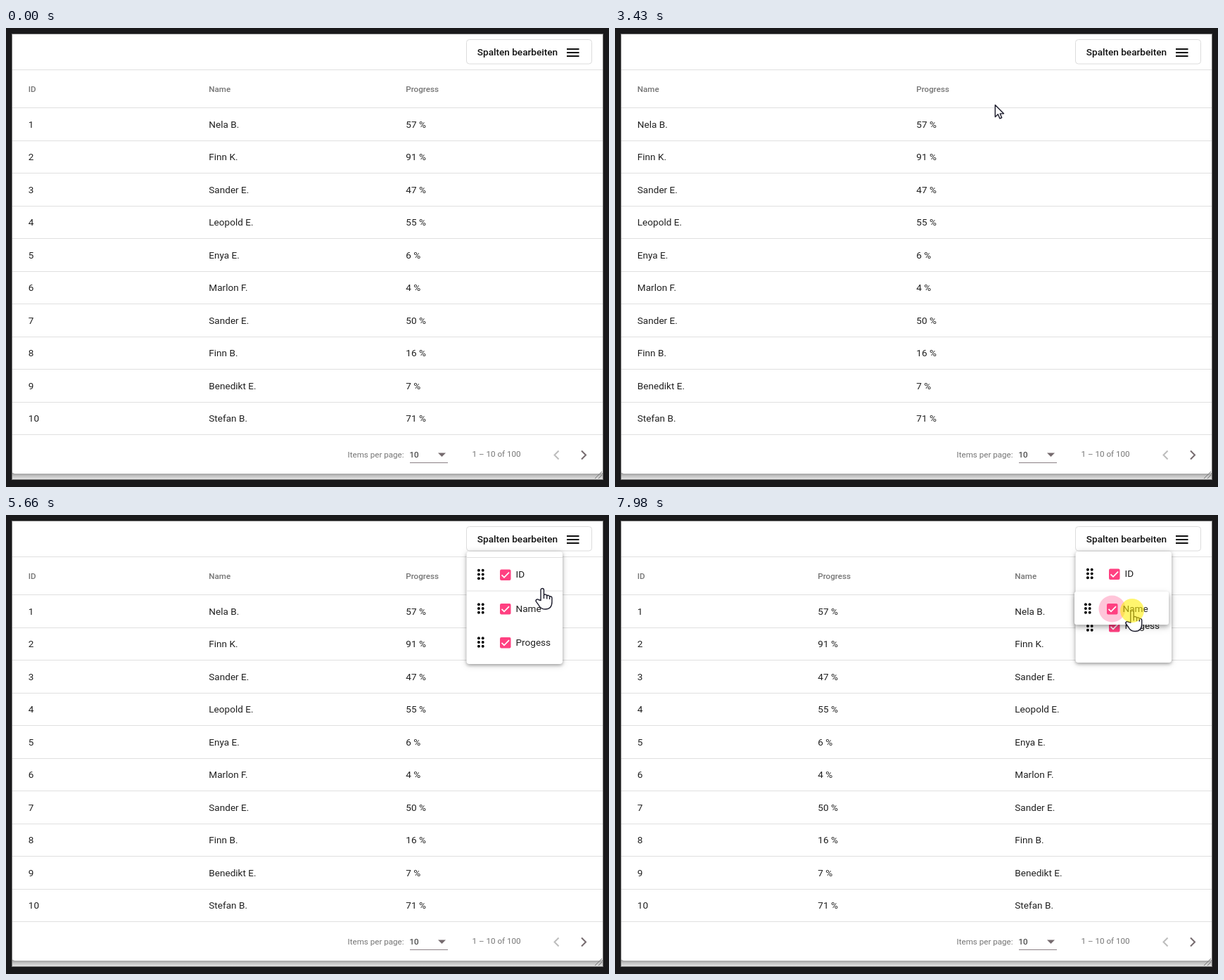
Animation, 857 px wide and 653 px high, one loop 8000 ms. Source, as an HTML page:

```html
<!DOCTYPE html>
<html lang="de">
<head>
<meta charset="utf-8">
<title>Spalten bearbeiten</title>
<style>
html, body { margin: 0; width: 100%; height: 100%; overflow: hidden; background: #19191b; }
svg { display: block; }
text { font: 13.58px Roboto, sans-serif; fill: #212121; white-space: pre; }
.small { font-size: 11.64px; fill: #757575; }
.medium { font-weight: 500; }
.line { fill: #e0e0e0; }
.icon { fill: none; stroke: #756a6e; stroke-width: 2; }
.panel { fill: #fff; filter: drop-shadow(0 2px 2px rgba(0,0,0,.26)) drop-shadow(0 1px 4px rgba(0,0,0,.2)); }
.preview { fill: #fff; filter: drop-shadow(0 3px 3px rgba(0,0,0,.24)) drop-shadow(0 3px 5px rgba(0,0,0,.16)); }
.ripple { fill: #ff4081; }
.cursor { fill: #fff; stroke: #1b1b2b; stroke-width: 1.4; stroke-linejoin: round; }
#menu { transform-origin: 654px 52px; }
</style>
</head>
<body>
<svg width="857" height="653" viewBox="0 0 857 653">
  <defs>
    <linearGradient id="shade" x2="0" y2="1">
      <stop stop-color="#999"/><stop offset=".5" stop-color="#c4c4c4"/><stop offset="1" stop-color="#e2e2e2"/>
    </linearGradient>
  </defs>
  <rect x="8.5" y="8.5" width="840" height="634" fill="#e6e6e6" stroke="#707070"/>
  <rect x="9" y="633" width="839" height="9" fill="url(#shade)"/>
  <path d="M9 9H848V630Q848 634 844 634H13Q9 634 9 630Z" fill="#fff"/>
  <path d="M837 641L847 631M842 641L847 636" stroke="#777" fill="none"/>

  <g id="rules"></g>
  <g id="tables"></g>

  <rect id="button" x="654.5" y="16.5" width="178" height="34.5" rx="4" stroke="#dcdcdc"/>
  <text class="medium" x="669.8" y="39" style="fill:#111">Spalten bearbeiten</text>
  <path d="M797 30H814.5M797 35H814.5M797 40H814.5" stroke="#111" stroke-width="2"/>

  <text class="small" x="485.5" y="611">Items per page:</text>
  <text class="small" x="573.5" y="611" style="fill:#212121">10</text>
  <path d="M614 604.5H625L619.5 610Z" fill="#756a6e"/>
  <rect x="574" y="618" width="54" height="1" fill="#8a8085"/>
  <text class="small" x="662.5" y="610">1 – 10 of 100</text>
  <path class="icon" d="M785.5 601.5L779.5 607.5L785.5 613.5" style="stroke:#bdbdbd"/>
  <path class="icon" d="M818 601.5L824 607.5L818 613.5"/>

  <g id="menu">
    <rect id="panel" class="panel" x="654.5" y="52" width="136.5" height="160" rx="4"/>
    <path id="focus" d="M655 60.5H791M655 108H791" stroke="#e0e0e0"/>
    <g id="items"></g>
  </g>

  <g id="pointer">
    <path id="arrow" class="cursor" d="M0 0V17L4 13.3L6.6 19.2L9.4 18L6.9 12.3H12.2Z"/>
    <g id="hand" class="cursor">
      <path d="M-2.2 17V2.2C-2.2 -.6 2.2 -.6 2.2 2.2V9.5C3 8 6.3 8.3 6.5 10.5C7.5 9.3 10.2 9.8 10.3 11.8C11.5 10.8 13.7 11.5 13.7 13.5V19C13.7 25 11 29.5 4 29.5C-1 29.5 -3.5 27 -5 24L-9 18.5C-10 16 -6.5 14.5 -5 16.3Z"/>
      <path d="M2.2 9.5V14.5M6.5 10.5V15M10.3 12V15.5" fill="none"/>
    </g>
    <circle id="press" r="17" fill="rgb(255,238,0)" fill-opacity=".57"/>
  </g>
</svg>
<script>
const $ = id => document.getElementById(id);
const show = (el, on) => el.style.display = on ? '' : 'none';
const clamp = v => Math.max(0, Math.min(1, v));
const ramp = (t, from, to) => clamp((t - from) / (to - from));
const smooth = p => p * p * (3 - 2 * p);
const easeOut = p => 1 - (1 - p) ** 3;

// Table
const people = 'Nela B.,Finn K.,Sander E.,Leopold E.,Enya E.,Marlon F.,Sander E.,Finn B.,Benedikt E.,Stefan B.'.split(',');
const percent = [57, 91, 47, 55, 6, 4, 50, 16, 7, 71];
const columns = {
  ID: people.map((_, i) => i + 1),
  Name: people,
  Progress: percent.map(v => v + ' %')
};
const wide = [31.8, 288.3, 568.3];
const layouts = {
  full: [['ID', 'Name', 'Progress'], wide],
  noId: [['Name', 'Progress'], [31.8, 428.3]],
  swapped: [['ID', 'Progress', 'Name'], wide]
};
const rule = y => `<rect class="line" x="9" y="${y}" width="839" height="1"/>`;
const rowY = (base, i) => Math.round(base + 46.5 * i);

$('rules').innerHTML = rule(59) + [...Array(11).keys()].map(i => rule(rowY(113, i))).join('');
$('tables').innerHTML = Object.entries(layouts).map(([id, [cols, xs]]) =>
  `<g id="${id}">` + cols.map((col, c) =>
    `<text class="small medium" x="${xs[c]}" y="91">${col}</text>` +
    columns[col].map((v, i) => `<text x="${xs[c]}" y="${rowY(141.5, i)}">${v}</text>`).join('')
  ).join('') + '</g>').join('');

// Menu items, drawn around y = 0
const dots = [-5.8, 0, 5.8].map(y => [671.9, 677.7].map(x =>
  `<circle cx="${x}" cy="${y}" r="1.95"/>`).join('')).join('');
$('items').innerHTML = ['ID', 'Progess', 'Name'].map(label => `<g>
  <rect class="preview" x="656" y="-24" width="134" height="47" rx="3"/>
  <circle class="ripple" cx="709.5" cy=".5" r="19"/>${dots}
  <g class="on"><rect x="702" y="-7" width="15.5" height="15.5" rx="2" fill="#ff4081"/>
    <path d="M704.5 .8L708 4.3L715 -2.9" fill="none" stroke="#fff" stroke-width="1.7"/></g>
  <rect class="off" x="703" y="-6" width="13.5" height="13.5" rx="1" fill="none" stroke="#756a6e" stroke-width="2"/>
  <text x="724.5" y="4.5">${label}</text></g>`).join('');
const [idItem, progressItem, nameItem] = $('items').children;

function place(item, x, y, { checked = true, dragged = false, ripple = 0, radius = 19 } = {}) {
  item.setAttribute('transform', `translate(${x} ${y})`);
  show(item.querySelector('.on'), checked);
  show(item.querySelector('.off'), !checked);
  show(item.querySelector('.preview'), dragged);
  const circle = item.querySelector('.ripple');
  circle.setAttribute('fill-opacity', ripple);
  circle.setAttribute('r', radius);
}

// Pointer actions: move from, move until, x, y, press, release
const home = [720, 645];
const acts = {
  open: [90, 940, 806, 40, 1260, 1490],
  hideId: [1560, 2190, 708, 87, 2340, 2490],
  close: [2970, 3200, 499, 120, 3200, 3290],
  reopen: [3350, 3700, 803, 43, 3730, 3850],
  showId: [3850, 4260, 712, 88, 4280, 4430],
  closeAgain: [4600, 4730, 639, 110, 4730, 4800],
  openAgain: [4800, 4960, 803, 43, 4960, 5300],
  grab: [5430, 5820, 739, 139.5, 5900, 6580],
  dragDown: [5900, 6270, 739, 183.5],
  dragUp: [7680, 7980, 735, 136, 7680, 8000]
};
const release = name => acts[name][5];
const between = (t, a, b) => t >= release(a) && t < release(b);

const pointerAt = t => Object.values(acts).reduce(([x, y], [from, to, tx, ty]) => {
  const p = smooth(ramp(t, from, to));
  return [x + (tx - x) * p, y + (ty - y) * p];
}, home);

function draw(t) {
  const [x, y] = pointerAt(t);
  const inBox = (left, top, right, bottom) => x > left && x < right && y > top && y < bottom;

  // Menu opens and closes on release
  const opened = between(t, 'open', 'close') ? 'open' : between(t, 'reopen', 'closeAgain') ? 'reopen'
    : t >= release('openAgain') ? 'openAgain' : '';
  const closed = t < release('reopen') ? 'close' : 'closeAgain';
  const fade = opened ? ramp(t, release(opened), release(opened) + 120)
    : t < release(closed) ? 0 : 1 - ramp(t, release(closed), release(closed) + 100);
  show($('menu'), fade > 0);
  $('menu').style.opacity = fade;
  $('menu').style.transform = `scale(${opened ? .8 + .2 * fade : 1})`;

  const overButton = !opened && inBox(654, 16, 833, 51);
  const overMenu = opened && inBox(654, 52, 791, 212);
  $('button').setAttribute('fill', overButton ? '#f6f6f6' : '#fff');

  const noId = between(t, 'hideId', 'showId');
  const layout = noId ? 'noId' : t < 6900 ? 'full' : 'swapped';
  for (const id in layouts) show($(id), id === layout);

  // Menu rows; the dragged one follows the pointer
  const grabbed = acts.grab[4], dropped = release('grab'), again = acts.dragUp[4];
  show($('focus'), t < grabbed);
  $('panel').setAttribute('height', t < dropped ? 160 : 158);

  const hover = t < acts.closeAgain[0] ? ramp(t, 4090, 4220) : 0;
  place(idItem, 0, t < grabbed ? 84.5 : 83.5, { checked: !noId, ripple: hover && .16, radius: 19 * hover });

  const swap = easeOut(ramp(t, 6136, 6386)) - easeOut(ramp(t, 7926, 8176));
  place(progressItem, 0, 181 - 48.5 * swap);

  const settle = 3.5 * easeOut(ramp(t, dropped, dropped + 150));
  const held = t >= grabbed;
  place(nameItem, held ? (x - 739) * .75 : 0, held ? y - 6.5 + settle : 133, {
    dragged: held && t < dropped + 150 || t > again,
    ripple: t < acts.grab[1] ? 0 : .16 + .14 * ramp(t, again, again + 200)
  });

  show($('pointer'), t >= acts.open[0]);
  $('pointer').setAttribute('transform', `translate(${x} ${y})`);
  show($('hand'), overButton || overMenu);
  show($('arrow'), !overButton && !overMenu);
  show($('press'), Object.values(acts).some(a => t >= a[4] && t < a[5]));
}

function frame() {
  draw(performance.now() % 8000);
  requestAnimationFrame(frame);
}
frame();
</script>
</body>
</html>
```
